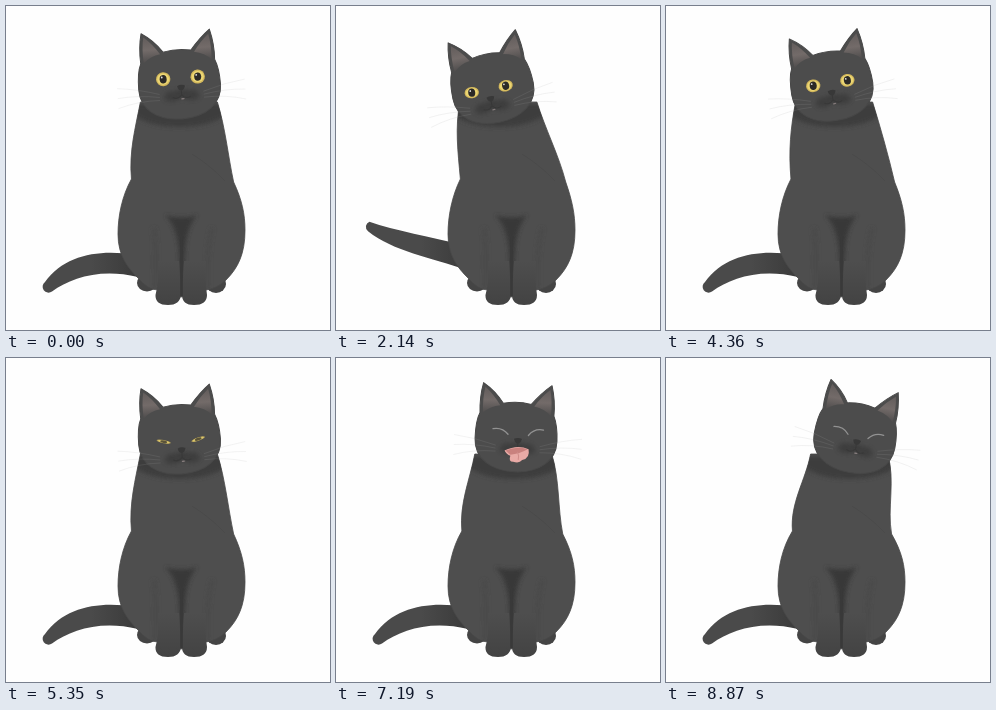
An HTML page for the animation above (8950 ms loop, 324 by 324 pixels).

```html
<!DOCTYPE html>
<html lang="en">
<head>
<meta charset="utf-8">
<title>Black cat</title>
<style>
html, body { margin: 0; width: 100%; height: 100%; overflow: hidden; background: #fefefe; }
svg { display: block; width: 100%; height: 100%; }
</style>
</head>
<body>
<svg viewBox="0 0 324 324">
  <defs>
    <filter id="soft" x="-40%" y="-30%" width="180%" height="160%"><feGaussianBlur stdDeviation="2"/></filter>
    <linearGradient id="tailFill" gradientUnits="userSpaceOnUse" x1="85" x2="124" y1="0" y2="0">
      <stop stop-color="#4a4a4a"/><stop offset="1" stop-color="#3d3d3d"/>
    </linearGradient>
    <linearGradient id="earFill" x1="0" x2="0" y1="0" y2="1">
      <stop stop-color="#625c5b"/><stop offset=".5" stop-color="#736b69"/><stop offset="1" stop-color="#4e4c4c"/>
    </linearGradient>
    <linearGradient id="legFill" gradientUnits="userSpaceOnUse" x1="0" x2="0" y1="255" y2="298">
      <stop stop-color="#4e4e4e"/><stop offset="1" stop-color="#434343"/>
    </linearGradient>
    <clipPath id="bodyClip"><path id="clipShape"/></clipPath>
  </defs>

  <path id="tail" fill="url(#tailFill)"/>

  <g fill="#444">
    <ellipse cx="141" cy="277" rx="10" ry="8.500"/>
    <ellipse cx="210" cy="278" rx="10" ry="9"/>
  </g>
  <path id="body" fill="#4e4e4e" stroke="#484848" stroke-width=".8"/>
  <g clip-path="url(#bodyClip)">
    <path id="neck" fill="#3d3d3d" filter="url(#soft)"/>
    <path d="M159 209Q176 214 191 209Q180 222 179 246L177 290H174L173 246Q171 220 159 209Z" fill="#383838" filter="url(#soft)"/>
    <path d="M148 222Q151 246 149 284M206 222Q200 246 202 284" fill="none" stroke="#474747" stroke-width="2.500" filter="url(#soft)"/>
    <path d="M186 148Q205 160 219 175" fill="none" stroke="#4a4a4a"/>
  </g>
  <g fill="url(#legFill)">
    <path d="M152 255Q153 276 149.500 289Q149 299 162 299Q174 299 175 289L173 255Z"/>
    <path d="M178 255L176 289Q176 299 188 299Q201 299 201 289Q199 276 200 255Z"/>
  </g>
  <path d="M175.500 230V290" stroke="#393939" stroke-width="2.500"/>

  <g id="head">
    <path d="M-41 8C-41-6-39-14-37-18Q-38-34-34.500-48Q-22-40-14-28Q0-31 14-28Q24-40 34-47.500Q38-32 37-17C40-10 41 0 41 8C41 28 24 40 0 40C-24 40-41 28-41 8Z"
      fill="#4c4c4c" stroke="#474747" stroke-linejoin="round"/>
    <path d="M-34-18Q-35-33-32.500-44Q-24-37-17-26Q-27-25-34-18Z" fill="url(#earFill)"/>
    <path d="M34-17Q35-32 32.500-43Q24-36 17-26Q28-24 34-17Z" fill="url(#earFill)"/>
    <g id="face">
      <path d="M0 11Q-5 13-13 13Q-21 18-15 22Q-7 25 0 20Q7 25 15 22Q21 18 13 13Q5 13 0 11Z" fill="#3d3d3d" filter="url(#soft)"/>
      <path d="M-4 8Q0 6 4 8Q3 12 0 13Q-3 12-4 8Z" fill="#383838"/>
      <path d="M0 13V17M-9 19Q-4 22 0 17Q4 22 9 19" fill="none" stroke="#383838"/>
      <ellipse id="lip" cx="1" cy="21" rx="1.800" ry=".7" fill="#857c7c"/>
      <g id="whiskers" fill="none" stroke="#aaa" stroke-opacity=".2" stroke-width=".7"></g>
      <g id="tongue">
        <path d="M-13 20Q0 13 11 18Q13 27 5 29Q2 33-4 31Q-9 31-7 25Q-11 24-13 20Z" fill="#e9aaa6"/>
        <path d="M-12 20Q-1 15 10 18Q2 23-7 24Z" fill="#c9817e"/>
        <path d="M0 21Q2 25 1 29" fill="none" stroke="#cf8c89"/>
      </g>
      <g id="eyes"></g>
    </g>
  </g>
</svg>
<script>
const LOOP = 8950;
const $ = id => document.getElementById(id);
const set = (el, attrs) => { for (const k in attrs) el.setAttribute(k, attrs[k]); };

// Smooth step from 0 at time a to 1 at time b
function ease(t, a, b) {
  const u = Math.min(1, Math.max(0, (t - a) / (b - a)));
  return u * u * (3 - 2 * u);
}
const pulse = (t, a, b, c, d) => ease(t, a, b) - ease(t, c, d);

for (const side of [-1, 1])
  for (const row of [-1, 0, 1])
    $("whiskers").innerHTML += `<path d="M${22 * side} ${18 + 3 * row}Q${44 * side} ${14 + 6 * row} ${64 * side} ${16 + 10 * row}"/>`;

const eyes = [-1, 1].map(side => {
  const g = document.createElementNS("http://www.w3.org/2000/svg", "g");
  g.innerHTML = `<ellipse rx="7.2" fill="#d3b85c"/><ellipse rx="6" fill="#ecd673"/>
    <ellipse rx="3.5" fill="#2c2a27"/><circle cx="-1.3" cy="-1.8" r=".9" fill="#ddd"/>
    <path d="M-8 1.500Q0 -3.500 8 1" fill="none" stroke="#929292" stroke-width="1.300" stroke-linecap="round"/>`;
  $("eyes").append(g);
  return { side, g, parts: [...g.children] };
});

function drawEyes(open) {
  const shut = open < .08;
  for (const { side, g, parts: [rim, iris, pupil, glint, lid] } of eyes) {
    set(g, { transform: `translate(${17.3 * side} 0) rotate(${-side * 20 * (1 - open)})` });
    set(rim, { ry: 7 * open });
    set(iris, { ry: 5.6 * open });
    set(pupil, { ry: Math.min(4.2, 5.5 * open) });
    set(glint, { opacity: open > .5 ? 1 : 0 });
    for (const p of [rim, iris, pupil]) set(p, { opacity: shut ? 0 : Math.min(1, .5 + open) });
    set(lid, { opacity: shut ? 1 : 0 });
  }
}

// lift: 0 rests on the floor, 1 is raised
function drawTail(lift) {
  const swing = 16 * lift * (1 - lift);
  const p = (x, y, dx, dy) => `${x + dx * lift - swing * (130 - x) / 92} ${y + dy * lift} `;
  set($("tail"), { d:
    "M" + p(130, 249, 0, -10) + "C" + p(95, 243, 0, -13) + p(59, 248, 0, -25) + p(39, 276, -5, -64) +
    "A5.5 5.5 0 0 0 " + p(46, 285.5, -14, -64) +
    "C" + p(65, 272, -7, -28) + p(94, 262, 0, -12) + p(132, 271, 0, -7) + "Z" });
}

// lean: sideways shift of the shoulders
function drawBody(lean) {
  const l = 135 + lean, r = 212 + lean;
  const d = `M${l} 96C${l - 5} 122 ${123 + lean * .1} 145 ${125.5 + lean * .1} 173C116 190 112 210 112 228
    C112 250 122 262 132 272Q142 284 152 284L175 291L200 284Q212 282 220 274C232 262 239 248 239 224
    C239 208 236 194 ${227.5 - lean * .2} 176C${222 - lean * .1} 150 ${r + 8} 122 ${r} 96Z`;
  set($("body"), { d });
  set($("clipShape"), { d });
  set($("neck"), { d: `M${l - 6} 98V110Q${l + 14} 122 ${l + 39} 121Q${r - 14} 122 ${r + 8} 110V98Z` });
}

function draw(t) {
  const left = pulse(t, 100, 1600, 3200, 5400);
  const tilt = pulse(t, 100, 1600, 3700, 5400);
  const nod = pulse(t, 4300, 5350, 5500, 7000);
  const right = ease(t, 5800, 8870);
  const lick = pulse(t, 6800, 7080, 7330, 7650);
  const x = 173 - 17.5 * left + 17 * right;

  drawTail(pulse(t, 1500, 2250, 2750, 3750));
  drawBody((x - 174) * .6);
  set($("head"), { transform: `translate(${x} ${73 + 4 * left + 3 * nod + 2 * right}) rotate(${-4.3 - 7.2 * tilt + 15 * right})` });
  set($("face"), { transform: `translate(${1.5 - 5.5 * left + right} ${-1 + 6.5 * left + 7.5 * nod})` });
  set($("tongue"), { transform: `translate(0 ${18 * (1 - lick)}) scale(${.4 + .6 * lick} ${lick})`, opacity: lick > .03 ? 1 : 0 });
  set($("lip"), { opacity: 1 - lick });
  drawEyes((1 - .2 * left) * (1 - ease(t, 4900, 5560)));
}

const start = performance.now();
function tick() {
  draw((performance.now() - start) % LOOP);
  requestAnimationFrame(tick);
}
tick();
</script>
</body>
</html>
```
